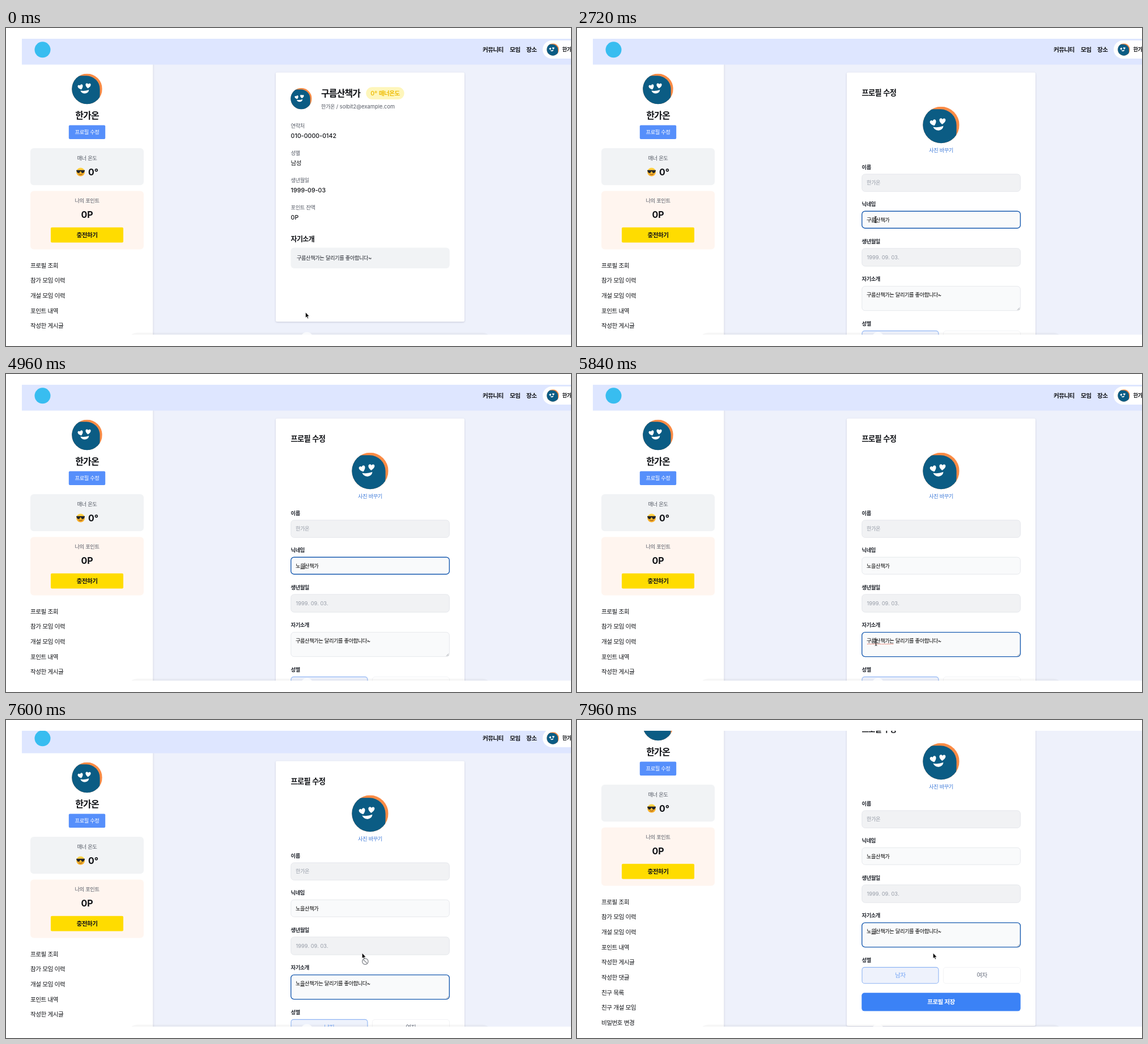
An HTML page for the animation above (8 s loop, 997x561 px).

```html
<!DOCTYPE html>
<html lang="ko">
<head>
<meta charset="utf-8">
<title>프로필 수정</title>
<style>
html, body { margin: 0; width: 100%; height: 100%; overflow: hidden; background: #fff; }
svg { display: block; width: 997px; height: 561px; }
text { font-family: Inter, "Noto Sans CJK KR", "Noto Sans CJK JP", sans-serif; white-space: pre; }
.ko { letter-spacing: -.056em; }
.lift { filter: drop-shadow(0 1px 1.5px rgba(40, 45, 80, .2)); }
</style>
</head>
<body>
<svg id="stage" viewBox="0 0 997 561" xmlns="http://www.w3.org/2000/svg"></svg>
<script>
const LOOP = 8000, STEP = 40;
const PERSON = '한가온', OLD = '구름', TAIL = '산책가', REST = '는 달리기를 좋아합니다~';
const INK = '#111317', GRAY = '#565b66', SM = 9.33, MD = 10.67, ADV = SM * .864;

// Hangul runs are set slightly tighter than Latin ones
const runs = s => s.split(/([가-힣ㄱ-ㅎ]+)/).filter(Boolean)
  .map(r => /[가-힣ㄱ-ㅎ]/.test(r) ? `<tspan class="ko">${r}</tspan>` : `<tspan>${r}</tspan>`).join('');

const text = (s, x, cy, size, weight = 500, fill = INK, anchor = 'start', id = '') =>
  `<text ${id && `id="${id}"`} x="${x}" y="${(cy + size * .37).toFixed(2)}" font-size="${size}" ` +
  `font-weight="${weight}" fill="${fill}" text-anchor="${anchor}">${runs(s)}</text>`;
const mid = (s, x, cy, size, weight, fill) => text(s, x, cy, size, weight, fill, 'middle');
const box = (x, y, w, h, r, fill, extra = '') =>
  `<rect x="${x}" y="${y}" width="${w}" height="${h}" rx="${r}" fill="${fill}" ${extra}/>`;
const field = (y, h, fill, id = '') =>
  box(502.8, y, 279.6, h, 5.5, fill, `stroke="#e1e4e9" stroke-width=".8" ${id && `id="${id}"`}`);

const HEART = 'M0 5.6C-7.6 .4-6-5-2.8-4.9-1.2-4.9-.3-3.8 0-2.8.3-3.8 1.2-4.9 2.8-4.9 6-5 7.6.4 0 5.6Z';
const avatar = (cx, cy, r) => `
  <g transform="translate(${cx - r} ${cy - r}) scale(${r / 32})"><g clip-path="url(#round)">
    <rect width="64" height="64" fill="#fb8b45"/>
    <rect x="-9" y="4.5" width="68" height="68" rx="28" fill="#0b5c84"/>
    <g fill="#fff">
      <path d="${HEART}" transform="translate(18.3 28) rotate(-18)"/>
      <path d="${HEART}" transform="translate(34.3 25.3) rotate(4)"/>
      <path d="M18 35.6Q27 37.3 36 33.8Q35.2 40.8 28 41.6Q20.8 42 18 35.6Z"/>
    </g></g></g>`;

const coolFace = (x, y) => `
  <g transform="translate(${x} ${y})">
    <circle r="7.5" fill="url(#sun)"/>
    <path d="M-7.4-3.2H7.4V-1.6L6.6-1Q6.2 2 3.7 2 1.2 2 .8-.9H-.8Q-1.2 2-3.7 2-6.2 2-6.6-1L-7.4-1.6Z" fill="#20242b"/>
    <path d="M-3.2 3.6Q0 6 3.4 3.4" fill="none" stroke="#8a4a12" stroke-width="1"/>
  </g>`;

const menu = ['프로필 조회', '참가 모임 이력', '개설 모임 이력', '포인트 내역', '작성한 게시글',
  '작성한 댓글', '친구 목록', '친구 개설 모임', '비밀번호 변경', '회원 탈퇴'];

const header = box(28, 19, 975, 45.6, 0, '#dee6ff') +
  '<circle cx="64.5" cy="38.3" r="14" fill="#38bdf0"/>' +
  text('커뮤니티', 841, 38, MD, 600) + text('모임', 889, 38, MD, 600) + text('장소', 918, 38, MD, 600) +
  box(947, 22, 120, 32, 16, '#fff') + avatar(965, 38, 10.7) + text(PERSON, 981.5, 38, SM, 600);

const sidebar = box(28, 60, 231.3, 700, 0, '#fff', 'class="lift"') +
  avatar(143, 107.4, 26.8) + mid(PERSON, 143, 154, 16, 700) +
  box(110.8, 171.5, 64.4, 24.6, 2, '#568ffb', 'id="edit"') + mid('프로필 수정', 143, 183.8, SM, 500, '#fff') +
  box(43, 212, 200, 65.3, 6, '#f1f3f5') + mid('매너 온도', 143, 229.7, SM, 400, GRAY) +
  coolFace(131.6, 254) + text('0°', 145, 254, 16, 700) +
  box(43, 287.5, 200, 103, 6, '#fff5ef') + mid('나의 포인트', 143, 305, SM, 400, GRAY) +
  mid('0P', 143, 329.5, 16, 700) +
  box(79, 351.7, 128, 26.8, 2, '#ffdc00') + mid('충전하기', 143, 365.2, MD, 700) +
  menu.map((s, i) => text(s, 43, 418.6 + i * 26.67, MD, 500)).join('');

const info = [['연락처', '010-0000-0142'], ['성별', '남성'], ['생년월일', '1999-09-03'], ['포인트 잔액', '0P']];
const profile = box(476, 78.5, 333, 439.5, 2, '#fff', 'class="lift"') +
  avatar(521, 124.6, 18.7) + text(OLD + TAIL, 556, 115.4, 16, 700) +
  box(635.3, 104.2, 67.4, 21.8, 10.9, '#fef6bb') + mid('0° 매너온도', 669, 115.3, MD, 600, '#eebd0a') +
  text(PERSON + ' / solbit2@example.com', 556, 138.2, SM, 400, GRAY) +
  info.map(([k, v], i) => text(k, 502.6, 172.7 + i * 48, SM, 400, GRAY) +
    text(v, 502.6, 190 + i * 48, MD, 500)).join('') +
  text('자기소개', 502.6, 372.3, 12, 600) + box(502.5, 387.6, 280.3, 36.3, 6, '#f1f3f5') +
  text(OLD + TAIL + REST, 513, 405.7, SM, 400, '#23272f');

const label = (s, y) => text(s, 502.6, y, SM, 600, '#22262e');
const form = box(476, 78.5, 333, 559.5, 2, '#fff', 'class="lift"') +
  text('프로필 수정', 502.6, 114, 13.33, 700) + avatar(642.5, 171, 32.2) +
  mid('사진 바꾸기', 642.5, 215.6, SM, 500, '#3b78d8') +
  label('이름', 245.5) + field(257.8, 30.6, '#f1f2f4') + text(PERSON, 511, 273, SM, 400, '#979da8') +
  label('닉네임', 310.8) + field(323.2, 30, '#f9fafb', 'nickBox') + text('', 511, 338.4, SM, 500, '#000', 'start', 'nick') +
  label('생년월일', 376.4) + field(388.8, 31.4, '#f1f2f4') + text('1999. 09. 03.', 511.5, 404.8, SM, 400, '#979da8') +
  label('자기소개', 442.8) + field(455.6, 43, '#f9fafb', 'bioBox') +
  '<path d="M777 497.5l4-4M779.3 497.5l1.8-1.8" stroke="#7d828a" stroke-width=".7"/>' +
  text('', 511, 470.4, SM, 500, '#000', 'start', 'bio') +
  '<path id="spell" d="M512 476.4H559" stroke="#e0563f" stroke-width="1" stroke-dasharray="1.6 1"/>' +
  '<path id="compose" stroke="#111" stroke-width=".8"/><path id="caret" stroke="#000" stroke-width=".8"/>' +
  label('성별', 521.7) +
  box(503, 534.4, 135, 28.4, 4.5, '#eef2fc', 'stroke="#8fb4f3" stroke-width="1.1"') +
  mid('남자', 570.4, 548.5, MD, 500, '#74a5f5') +
  box(646.5, 534.4, 136, 28.4, 4.5, '#fff', 'stroke="#eff0f3" stroke-width=".8"') +
  mid('여자', 714.5, 548.5, MD, 500, '#6b7280') +
  box(502.3, 579.2, 280.4, 32.4, 5, '#3b82f6') + mid('프로필 저장', 642.5, 595.3, MD, 700, '#fff');

const ARROW = '<path d="M0 0V9.8L2.2 7.8 3.7 11.2 5.3 10.5 3.8 7.2H6.8Z" stroke="#fff" stroke-width=".7"/>';
const cursors = {
  arrow: ARROW,
  hand: '<path transform="translate(-3.1 -.7)" d="M2.2 6V1.6a.9.9 0 0 1 1.8 0V4.6l4 .8q1.4.3 1.3 1.8L8.6 11H4L.5 7.3q.2-1.4 1.7.1Z" fill="#fff" stroke="#000" stroke-width=".9"/>',
  beam: '<path d="M-1.8-5.6Q0-5.6 0-4.4 0-5.6 1.8-5.6M0-4.6V4.6M-1.8 5.6Q0 5.6 0 4.4 0 5.6 1.8 5.6" fill="none" stroke="#000" stroke-width=".9"/>',
  deny: ARROW + '<g transform="translate(5.6 15)" fill="#fff" fill-opacity=".7" stroke="#8d9096" stroke-width="1.4"><circle r="5.2"/><path d="M-3.6-3.6L3.6 3.6"/></g>'
};

const stage = document.getElementById('stage');
stage.innerHTML = `
  <defs>
    <clipPath id="view"><rect x="28" y="19" width="969" height="522"/></clipPath>
    <clipPath id="round"><circle cx="32" cy="32" r="32"/></clipPath>
    <linearGradient id="sun" x2="0" y2="1"><stop stop-color="#ffd84a"/><stop offset="1" stop-color="#f5a623"/></linearGradient>
  </defs>
  <g clip-path="url(#view)">
    <rect x="28" y="19" width="969" height="522" fill="#eef1fb"/>
    <g id="page"><rect x="28" y="19" width="231" height="60" fill="#fff"/>${sidebar}${header}
      <g id="profile">${profile}</g><g id="form">${form}</g></g>
    <rect id="status" x="28" y="538.6" width="138" height="4" rx="1" fill="#d8e8d6"/>
    <rect x="214" y="537.4" width="644" height="40" rx="18" fill="#000" fill-opacity=".035"/>
    <circle cx="531" cy="547.5" r="11" fill="#fff" fill-opacity=".75"/>
    <g id="cursor">${Object.keys(cursors).map(k => `<g id="${k}">${cursors[k]}</g>`).join('')}</g>
  </g>`;

const el = id => document.getElementById(id);
const show = (id, on) => el(id).setAttribute('visibility', on ? 'inherit' : 'hidden');
const within = (v, a, b) => v >= a && v < b;
const smooth = k => k * k * (3 - 2 * k);

// [time, x, y]
const MOVES = [[0, 528.5, 501.5], [520, 528.5, 501.5], [720, 190.5, 217.5], [880, 190.5, 217.5], [1000, 158.8, 186],
  [1720, 158.8, 186], [2280, 527, 338], [5080, 527, 338], [5560, 527.6, 473.6], [7120, 527.6, 473.6], [7440, 628.3, 411]];
// [time, offset]
const SCROLL = [[0, 0], [7560, 0], [7600, 6], [7640, 20], [7680, 37], [7720, 53.3], [7800, 76], [7880, 91], [7960, 98]];
// [time, leading syllables]
const NICK = [[0, '구름'], [3000, '구'], [3400, ''], [4040, 'ㄴ'], [4160, '노'], [4320, '농'], [4440, '노으'], [4600, '노을']];
const BIO = [[0, '구름'], [6120, '구'], [6280, ''], [6440, 'ㄴ'], [6560, '노'], [6760, '농'], [6880, '노으'], [6960, '노을']];
const FORM_AT = 1320, NICK_AT = 2480, BIO_AT = 5640;

function track(rows, t, ease = k => k) {
  const i = rows.findIndex(r => r[0] > t);
  if (i < 0) return rows[rows.length - 1].slice(1);
  const a = rows[i - 1], b = rows[i], k = ease((t - a[0]) / (b[0] - a[0]));
  return a.slice(1).map((v, j) => v + (b[j + 1] - v) * k);
}
const latest = (rows, t) => rows.filter(r => r[0] <= t).pop();

function cursorKind(x, y, open) {
  if (within(x, 111, 175) && within(y, 171, 196)) return 'hand';
  if (!open || !within(x, 503, 783)) return 'arrow';
  if (within(y, 323, 354) || within(y, 455, 499)) return 'beam';
  return within(y, 257, 289) || within(y, 388, 421) ? 'deny' : 'arrow';
}

function focusBox(id, on) {
  el(id).setAttribute('stroke', on ? '#185bb0' : '#e1e4e9');
  el(id).setAttribute('stroke-width', on ? 1.4 : .8);
}

function setText(id, s) {
  const node = el(id);
  if (node.dataset.s !== s) { node.dataset.s = s; node.innerHTML = runs(s); }
}

function draw(t) {
  const open = t >= FORM_AT, onNick = within(t, NICK_AT, BIO_AT), onBio = t >= BIO_AT;
  const [scroll] = track(SCROLL, t);
  el('page').setAttribute('transform', `translate(0 ${-scroll})`);
  show('profile', !open);
  show('form', open);

  const nick = latest(NICK, t), bio = latest(BIO, t);
  setText('nick', nick[1] + TAIL);
  setText('bio', bio[1] + TAIL + REST);
  focusBox('nickBox', onNick);
  focusBox('bioBox', onBio);

  const typed = onBio ? bio : nick, cy = onBio ? 470.4 : 338.4;
  const end = 511 + typed[1].length * ADV;
  const since = t - Math.max(typed[0], onBio ? BIO_AT : NICK_AT);
  el('caret').setAttribute('d', `M${end} ${cy - 5.4}v10.8`);
  show('caret', open && (onNick || onBio) && since % 1000 < 500);
  el('compose').setAttribute('d', `M${end - ADV + .4} ${cy + 5.4}h${ADV - .8}`);
  show('compose', (onBio && t >= 6440) || within(t, 4040, 5120));
  show('spell', within(t, BIO_AT, 6120));

  const [x, y] = track(MOVES, t, smooth);
  const kind = cursorKind(x, y + (t < 7800 ? 0 : scroll), open);
  const hidden = within(t, 3000, 5120) || within(t, 6120, 7200);
  el('cursor').setAttribute('transform', `translate(${x} ${y})`);
  show('cursor', !hidden);
  for (const k in cursors) show(k, k === kind);
  el('edit').setAttribute('fill', kind === 'hand' ? '#8ba4fb' : '#568ffb');
  show('status', kind === 'hand');
}

function tick() {
  draw(Math.floor(performance.now() % LOOP / STEP) * STEP);
  requestAnimationFrame(tick);
}
tick();
</script>
</body>
</html>
```
